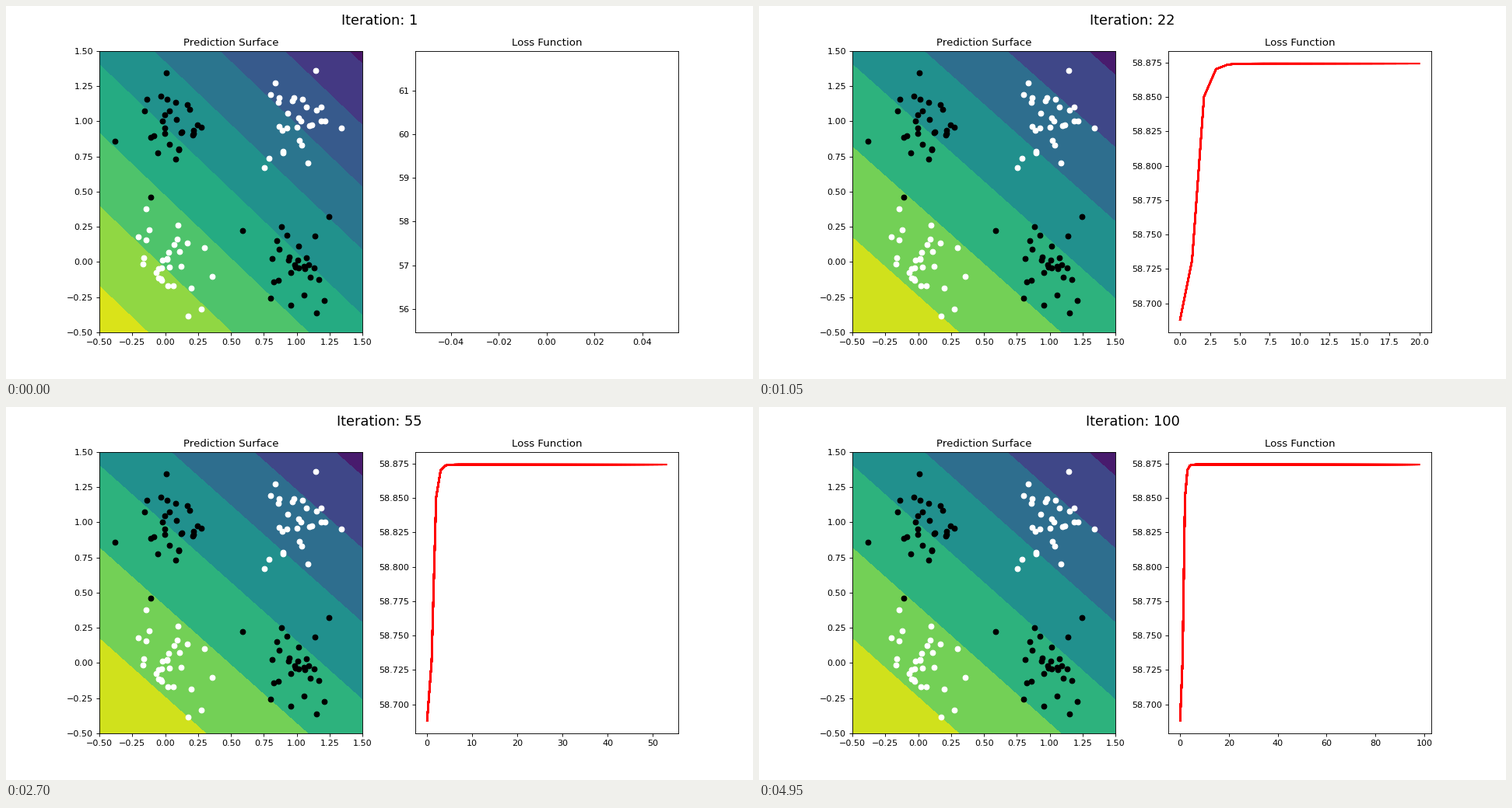
Write a matplotlib script that moves like this. It is 960 px wide and 480 px high and loops after 5 s.

```python
import numpy as np
import matplotlib.pyplot as plt
from matplotlib.animation import FuncAnimation

FRAMES = 100
CLUSTER_SIZE = 30
plt.rcParams["font.family"] = "DejaVu Sans"

# Centre and colour of each cluster: equal coordinates are white
CLUSTERS = [((0.03, 0.0), "white"), ((1.0, 1.0), "white"),
            ((0.04, 0.96), "black"), ((0.99, -0.02), "black")]
SPREAD = (0.14, 0.165)

# Bias, x weight and y weight of the classifier
W_START = np.array([0.926, -0.327, -0.367])
W_END = np.array([1.0035, -0.3246, -0.390])

# Loss climbs to its limit, the gap shrinking at a steady rate
LOSS_END = 58.8743
gap = 0.143 * 0.168 ** (np.arange(FRAMES) - 1.0)
gap[0] = 0.1861
loss = LOSS_END - gap

fig, (ax, loss_ax) = plt.subplots(1, 2, figsize=(12, 6), dpi=80)
fig.subplots_adjust(left=0.125, right=0.9, bottom=0.125, top=0.88, wspace=0.2)
heading = fig.suptitle("", fontsize=16)
ax.set_title("Prediction Surface")
loss_ax.set_title("Loss Function")

axis = np.linspace(-0.5, 1.5, 201)
grid_x, grid_y = np.meshgrid(axis, axis)

rng = np.random.default_rng(4)
for centre, color in CLUSTERS:
    offsets = rng.normal(size=(CLUSTER_SIZE, 2))
    offsets = (offsets - offsets.mean(axis=0)) / offsets.std(axis=0)
    x, y = (centre + offsets * SPREAD).T
    ax.scatter(x, y, c=color, zorder=2)
ax.set(xlim=(-0.5, 1.5), ylim=(-0.5, 1.5))

# Every step leaves its own curve, so overlaps thicken the edges
curves = [loss_ax.plot(loss[:n], color="red", linewidth=2)[0]
          for n in range(1, FRAMES)]
surface = []


def padded(lo, hi):
    if lo == hi:
        spread = 0.05 * abs(lo) or 0.05
        lo, hi = lo - spread, hi + spread
    margin = 0.05 * (hi - lo)
    return lo - margin, hi + margin


def draw_surface(i):
    while surface:
        surface.pop().remove()
    t = 1 - gap[i] / gap[0]
    bias, wx, wy = W_START + t * (W_END - W_START)
    prob = 1 / (1 + np.exp(-(bias + wx * grid_x + wy * grid_y)))
    if t < 0.5:
        levels = np.linspace(0.44, 0.80, 10)
    else:
        levels = np.linspace(0.45, 0.80, 8)
    surface.append(ax.contourf(grid_x, grid_y, prob, levels,
                               cmap="viridis", zorder=1))


def update(i):
    heading.set_text(f"Iteration: {i + 1}")
    draw_surface(i)
    for n, curve in enumerate(curves, 1):
        curve.set_visible(n <= i)
    count = max(1, i)
    loss_ax.set_xlim(*padded(0, count - 1))
    loss_ax.set_ylim(*padded(loss[0], loss[count - 1]))


anim = FuncAnimation(fig, update, frames=FRAMES, interval=50,
                     init_func=lambda: [], repeat=True, repeat_delay=0)
plt.show()
```
